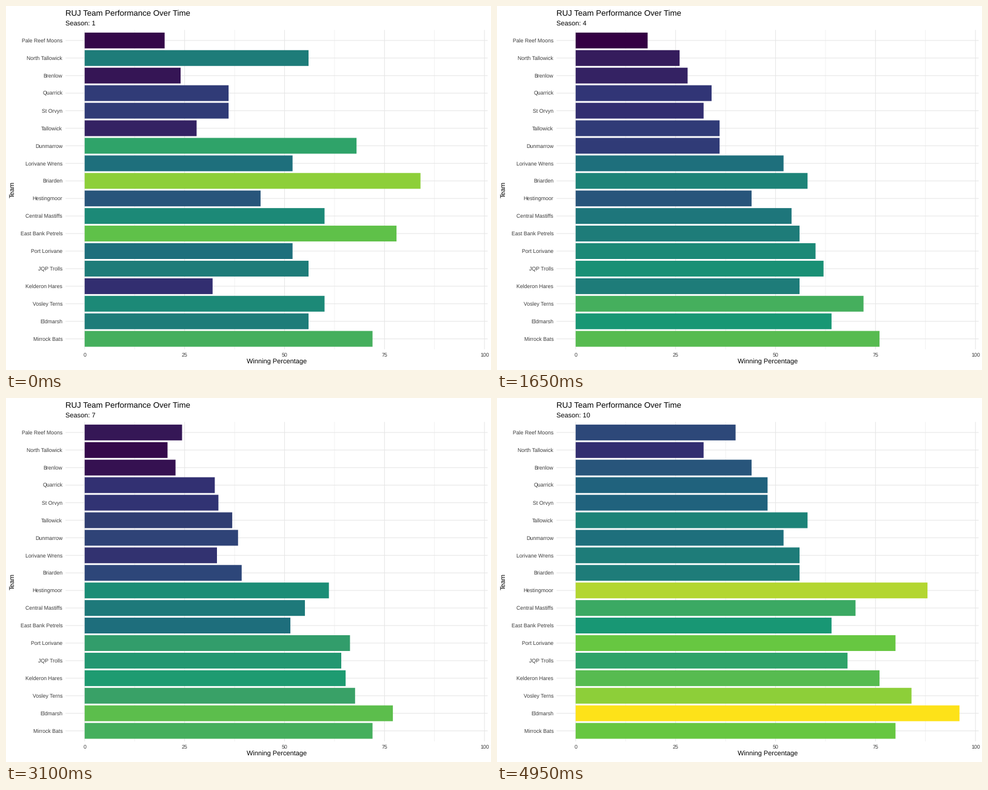
A matplotlib script for the animation above (5000 ms loop, 800 by 600 pixels).

```python
import numpy as np
import matplotlib.pyplot as plt
from matplotlib.animation import FuncAnimation
from matplotlib.patches import Rectangle

plt.rcParams["font.family"] = "Liberation Sans"
plt.rcParams["text.hinting"] = "none"

W, H, DPI = 800, 600, 100
STEPS = 11  # frames from one season to the next
LEFT, RIGHT, TOP, BOTTOM = 98.1, 794.5, 39.5, 566.0
ROW = (BOTTOM - TOP) / 18.2
UNIT = (RIGHT - LEFT) / 105.6
ZERO = LEFT + 4.8 * UNIT

TEAMS = [
    "Pale Reef Moons", "North Tallowick", "Brenlow", "Quarrick", "St Orvyn",
    "Tallowick", "Dunmarrow", "Lorivane Wrens", "Briarden", "Hestingmoor",
    "Central Mastiffs", "East Bank Petrels", "Port Lorivane", "JQP Trolls",
    "Kelderon Hares", "Vosley Terns", "Eldmarsh", "Mirrock Bats",
]

# Winning percentages, one row per team: seasons 1 to 5
EARLY = np.array([
    [20, 24, 22, 18, 24], [56, 38, 22, 26, 22], [24, 22, 26, 28, 32],
    [36, 28, 24, 34, 28], [36, 32, 30, 32, 40], [28, 32, 28, 36, 36],
    [68, 32, 36, 36, 40], [52, 50, 44, 52, 42], [84, 70, 70, 58, 46],
    [44, 60, 48, 44, 36], [60, 64, 58, 54, 52], [78, 76, 72, 56, 58],
    [52, 48, 56, 60, 54], [56, 64, 60, 62, 64], [32, 42, 52, 56, 64],
    [60, 60, 68, 72, 64], [56, 52, 64, 64, 72], [72, 72, 68, 76, 68],
])

# Seasons 6, 7, 8 and 10; season 9 lies midway between its neighbours
LATE = np.array([
    [18, 28, 32, 40], [22, 20, 22, 32], [24, 22, 34, 44],
    [30, 34, 38, 48], [36, 32, 40, 48], [28, 42, 46, 58],
    [32, 42, 48, 52], [28, 36, 42, 56], [38, 40, 44, 56],
    [56, 64, 80, 88], [50, 58, 62, 70], [54, 50, 58, 64],
    [60, 70, 76, 80], [68, 62, 64, 68], [64, 66, 68, 76],
    [60, 72, 78, 84], [72, 80, 88, 96], [72, 72, 74, 80],
])
NINTH = LATE[:, 2:].mean(axis=1)
WINS = np.column_stack([EARLY, LATE[:, :3], NINTH, LATE[:, 3]])

TO_XYZ = np.array([[0.4124, 0.3576, 0.1805],
                   [0.2126, 0.7152, 0.0722],
                   [0.0193, 0.1192, 0.9505]])
WHITE = TO_XYZ.sum(axis=1)


def rgb_to_lab(rgb):
    lin = np.where(rgb > 0.04045, ((rgb + 0.055) / 1.055) ** 2.4, rgb / 12.92)
    xyz = lin @ TO_XYZ.T / WHITE
    f = np.where(xyz > 0.008856, np.cbrt(xyz), 7.787 * xyz + 16 / 116)
    x, y, z = f.T
    return np.column_stack([116 * y - 16, 500 * (x - y), 200 * (y - z)])


def lab_to_rgb(lab):
    y = (lab[:, 0] + 16) / 116
    f = np.column_stack([y + lab[:, 1] / 500, y, y - lab[:, 2] / 200])
    xyz = np.where(f > 0.2069, f ** 3, (f - 16 / 116) / 7.787) * WHITE
    lin = np.clip(xyz @ np.linalg.inv(TO_XYZ).T, 0, 1)
    rgb = np.where(lin > 0.0031308, 1.055 * lin ** (1 / 2.4) - 0.055, 12.92 * lin)
    return np.clip(rgb, 0, 1)


def darken(rgb):
    return np.asarray(rgb) ** 1.21


def hex_rgb(code):
    return [int(code[i:i + 2], 16) / 255 for i in (0, 2, 4)]


STOPS = rgb_to_lab(np.array([hex_rgb(c) for c in (
    "440154", "414487", "2A788E", "22A884", "7AD151", "FDE725")]))


def fill_lab(values):
    t = (values - 18) / 78 * 5
    return np.column_stack([np.interp(t, range(6), ch) for ch in STOPS.T])


SHADES = [fill_lab(WINS[:, s]) for s in range(10)]
GRID = darken([235 / 255] * 3)
GREY = darken([77 / 255] * 3)

fig = plt.figure(figsize=(W / DPI, H / DPI), dpi=DPI, facecolor="white")
ax = fig.add_axes([0, 0, 1, 1])
ax.set_xlim(0, W)
ax.set_ylim(H, 0)
ax.axis("off")


def line(xs, ys, width):
    ax.plot(xs, ys, color=GRID, lw=width * 72 / DPI, snap=False,
            solid_capstyle="butt", zorder=1)


def label(x, y, text, size, color="black", **kw):
    return ax.text(x, y, text, fontsize=size * 72 / DPI, color=color,
                   va="baseline", **kw)


for pct in (12.5, 37.5, 62.5, 87.5):
    line([ZERO + pct * UNIT] * 2, [TOP, BOTTOM], 0.53)

rows = TOP + ROW * (0.6 + np.arange(len(TEAMS)))
for y, team in zip(rows, TEAMS):
    line([LEFT, RIGHT], [y, y], 1.07)
    label(93.2, y + 3.1, team, 8.8, GREY, ha="right")

for pct in (0, 25, 50, 75, 100):
    x = ZERO + pct * UNIT
    line([x, x], [TOP, BOTTOM], 1.07)
    label(x, 578, str(pct), 8.8, GREY, ha="center")

label(LEFT, 16, "RUJ Team Performance Over Time", 13.2)
season = label(LEFT, 32, "", 11)
label((LEFT + RIGHT) / 2, 590, "Winning Percentage", 11, ha="center")
label(13.4, (TOP + BOTTOM) / 2, "Team", 11, ha="center", rotation=90,
      rotation_mode="anchor")

bars = [ax.add_patch(Rectangle((ZERO, y - 0.45 * ROW), 0, 0.9 * ROW, lw=0,
                               snap=False, zorder=2)) for y in rows]


def draw(frame):
    s = min(frame // STEPS, 8)
    t = frame / STEPS - s
    values = WINS[:, s] * (1 - t) + WINS[:, s + 1] * t
    colors = darken(lab_to_rgb(SHADES[s] * (1 - t) + SHADES[s + 1] * t))
    for bar, value, color in zip(bars, values, colors):
        bar.set_width(value * UNIT)
        bar.set_facecolor(color)
    season.set_text(f"Season: {round(1 + frame / STEPS)}")
    return [*bars, season]


anim = FuncAnimation(fig, draw, frames=100, interval=50, repeat=True)
plt.show()
```
